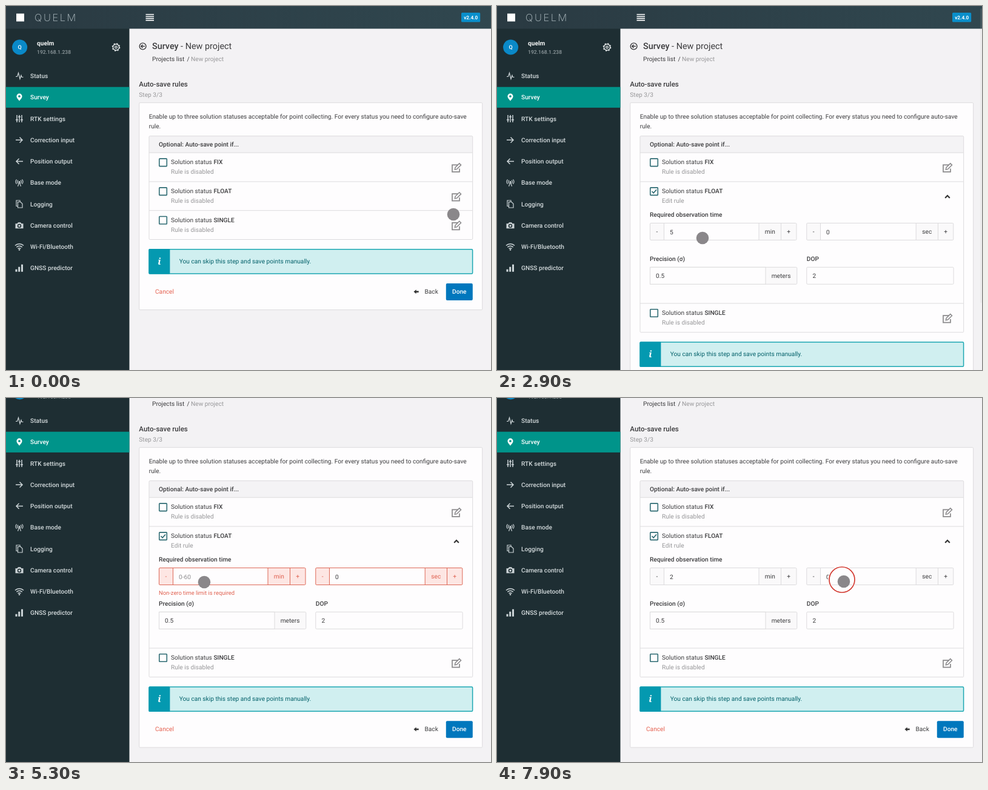
Recreate the animation shown at these times as an HTML page. Size 800x601 px, loop 8 s.

```html
<!DOCTYPE html>
<html lang="en">
<head>
<meta charset="utf-8">
<title>Survey auto-save rules</title>
<style>
html, body { margin: 0; width: 100%; height: 100%; overflow: hidden; background: #f3f2f4; }
svg { display: block; font: 10.16px Roboto, sans-serif; text-rendering: geometricPrecision; }
text { fill: #3c3c3e; white-space: pre; }
.m { font-weight: 500; }
.g { fill: #979799; }
.nav text { fill: #d3dadc; font-weight: 500; }
.line { fill: none; stroke: #dcdbdd; }
.icon { fill: none; stroke: #ccd4d7; stroke-width: 1.5; }
.edit { fill: none; stroke: #8a898b; stroke-width: 1.7; }
.box { fill: #fefdfe; stroke: #2c6a72; stroke-width: 1.56; }
.side { fill: #faf9fa; stroke: #dcdbdd; }
.input { fill: #fefdfe; stroke: #dcdbdd; }
.err .side { fill: #fde6e3; stroke: #dd6857; }
.err .input { stroke: #dd6857; }
.err .unit { fill: #e0604f; }
</style>
</head>
<body>
<svg width="800" height="601" viewBox="0 0 800 601"></svg>
<script>
const svg = document.querySelector('svg');
const SCROLL = 78, GROWTH = 153.3, LOOP = 8000;

const text = (x, y, s, cls = '', extra = '') => `<text x="${x}" y="${y}" class="${cls}" ${extra}>${s}</text>`;
const rect = (x, y, w, h, extra) => `<rect x="${x}" y="${y}" width="${w}" height="${h}" ${extra}/>`;
const path = (d, extra = '') => `<path d="${d}" ${extra}/>`;
const circle = (x, y, r, extra = '') => `<circle cx="${x}" cy="${y}" r="${r}" ${extra}/>`;
const group = (x, y, body, extra = '') => `<g transform="translate(${x} ${y})" ${extra}>${body}</g>`;

// Icons are drawn around their own centre.
const solid = 'fill="#ccd4d7" stroke="none"';
const menu = [
  ['Status', path('M-6 1H-3.5L-1.5-5L1 5L3 -1L4 2H6.5', 'stroke-width="1.2"')],
  ['Survey', path('M0 6C-2 3-4.6 1-4.6-1.6A4.6 4.6 0 0 1 4.6-1.6C4.6 1 2 3 0 6Z', 'fill="#fff" stroke="none"') + circle(0, -1.6, 1.8, 'fill="#00948a" stroke="none"')],
  ['RTK settings', path('M-4-6V6M0-6V6M4-6V6M-6 2H-2M-2-3H2M2 2H6')],
  ['Correction input', path('M-6 0H5M.5-4.5L5 0L.5 4.5')],
  ['Position output', path('M6 0H-5M-.5-4.5L-5 0L-.5 4.5')],
  ['Base mode', path('M0-1L-2.5 6M0-1L2.5 6M-2-4A3 3 0 0 0-2 1M2-4A3 3 0 0 1 2 1M-4.5-5.5A6 6 0 0 0-4.5 2M4.5-5.5A6 6 0 0 1 4.5 2', 'stroke-width="1.2"') + circle(0, -1.5, 1.3, solid)],
  ['Logging', path('M-2.5-3.5H2L5-.5V6H-2.5ZM-2.5 3.5H-5V-6H1V-3.5', 'stroke-width="1.2"')],
  ['Camera control', path('M-6.5-3H-3.5L-2-5H2L3.5-3H6.5V5H-6.5Z', solid) + circle(0, .7, 2.5, 'stroke="#1e2e33"')],
  ['Wi-Fi/Bluetooth', path('M-7-2A10 10 0 0 1 7-2M-4.7.7A6.6 6.6 0 0 1 4.7.7M-2.4 3.2A3.3 3.3 0 0 1 2.4 3.2') + circle(0, 5, 1.3, solid)],
  ['GNSS predictor', path('M-6.5 6V2H-3.5V6ZM-1.8 6V-2H1.2V6ZM3 6V-6H6V6Z', solid)],
];
const pencil = path('M2.5-5H-7V6.5H5V1') + path('M-2.7 2.7L-2-.7L4.8-7.5L7.5-4.8L.7 2Z', 'stroke-width="1.5"');

const header = `
  ${rect(0, 0, 800, 37.5, 'fill="url(#bar)"')}
  ${rect(17, 12.5, 13, 13, 'fill="#fff"')}
  ${text(47, 25, 'QUELM', '', 'style="font:200 16.4px Inter,sans-serif;letter-spacing:2.6px;fill:#b9c6cb"')}
  ${path('M230.5 14H244M230.5 17.2H244M230.5 20.4H244M230.5 23.6H244', 'stroke="#fff" stroke-width="1.6"')}
  ${rect(751, 11, 31.2, 15.6, 'rx="1.5" fill="#0a8fcb"')}
  ${text(766.7, 21.8, 'v2.4.0', '', 'text-anchor="middle" style="font-size:8.2px;font-weight:700;fill:#fff"')}`;

const sidebar = `
  ${circle(22.6, 68, 12.5, 'fill="#0a89c8"')}
  ${text(22.6, 71.3, 'Q', 'm', 'text-anchor="middle" style="font-size:9px;fill:#fff"')}
  ${text(51, 64.5, 'quelm', '', 'style="font-weight:700;fill:#f4f6f6"')}
  ${text(51, 79, '192.168.1.238', '', 'style="font-size:8.6px;fill:#8f9a9e"')}
  ${group(181.5, 68, circle(0, 0, 5) + circle(0, 0, 6.2, 'stroke-dasharray="2.4 2.47"') + circle(0, 0, 1.8), 'class="icon" style="stroke:#e6eaeb;stroke-width:1.3"')}
  ${rect(0, 133.7, 203.5, 34.2, 'fill="#00948a"')}
  ${menu.map(([label, icon], i) => {
    const y = 115.5 + i * 35.25;
    return group(22, y, icon, 'class="icon"' + (i === 1 ? ' style="stroke:#fff"' : '')) +
      text(40, y + 3.5, label, '', i === 1 ? 'style="fill:#fff"' : '');
  }).join('')}`;

const statusRow = (y, name) => `
  ${rect(252.8, y - 6.1, 12.5, 12.5, 'rx=".8" class="box"')}
  ${text(272, y + 3.2, `Solution status <tspan class="m">${name}</tspan>`)}`;
const disabledRule = y => text(272, y + 19, 'Rule is disabled', 'g') + group(743, y + 9.2, pencil, 'class="edit"');

const stepper = (x, w, cuts, unit, value, id) => {
  const [a, b, c] = cuts;
  const middle = 'text-anchor="middle"';
  return rect(x, 358.5, w, 28, 'rx="1.5" class="side"') +
    rect(a, 358.5, b - a, 28, 'class="input"') +
    path(`M${c} 358.5V386.5`, 'class="side"') +
    text((x + a) / 2, 375.7, '-', 'unit', middle) +
    text((b + c) / 2, 376, unit, 'unit', middle) +
    text((c + x + w) / 2, 376, '+', 'unit', middle) +
    text(a + 9.5, 376.5, value, '', `id="${id}"`);
};

const ruleForm = `
  ${text(252, 348.3, 'Required observation time', 'm')}
  <g id="time">
    ${stepper(252.5, 241.5, [275.5, 432, 468.5], 'min', '5', 'minutes')}
    ${stepper(510.8, 242, [533.5, 691.2, 727.5], 'sec', '0', 'seconds')}
    ${text(252, 402.5, 'Non-zero time limit is required', 'unit', 'id="warning" style="font-size:9.4px"')}
    ${rect(0, 366.5, .9, 12, 'id="caret" fill="#222"')}
  </g>
  ${text(252, 421, 'Precision (σ)', 'm')}
  ${rect(252.5, 431.3, 242.3, 28, 'rx="1.5" class="side"')}
  ${rect(252.5, 431.3, 190.5, 28, 'class="input"')}
  ${text(262, 449.2, '0.5')}${text(452.7, 448.8, 'meters')}
  ${text(510.8, 421, 'DOP', 'm')}
  ${rect(510.8, 431.3, 242.3, 28, 'rx="1.5" class="input"')}
  ${text(520.5, 449.2, '2')}`;

const content = `
  ${circle(225.6, 66.5, 5.4, 'fill="none" stroke="#3c3c3e" stroke-width="1.4"')}
  ${path('M229 66.5H223M225.5 63.7L222.7 66.5L225.5 69.3', 'fill="none" stroke="#3c3c3e" stroke-width="1.4"')}
  ${text(241, 71.3, '<tspan class="m">Survey</tspan> - New project', '', 'style="font-size:14.4px"')}
  ${text(241, 91, 'Projects list')}${text(298.5, 91, '/')}${text(305, 91, 'New project', 'g')}
  ${text(219.3, 132.8, 'Auto-save rules', 'm', 'style="font-size:11.55px"')}
  ${text(219.3, 149.5, 'Step 3/3', 'g')}
  <rect id="card" x="219.7" y="159.7" width="566" rx="1.5" fill="#fefdfe" stroke="#dcdbdd"/>
  ${text(235.7, 186.4, 'Enable up to three solution statuses acceptable for point collecting. For every status you need to configure auto-save')}
  ${text(235.7, 202, 'rule.')}
  ${rect(236, 214.7, 533.7, 27.5, 'fill="#f4f3f5"')}
  <rect id="table" x="236" y="214.7" width="533.7" rx="1.5" class="line"/>
  ${path('M236 242.2H769.7M236 290H769.7', 'class="line"')}
  ${text(252, 231.8, 'Optional: Auto-save point if...', 'm')}
  ${statusRow(258.2, 'FIX')}${disabledRule(258.2)}
  ${statusRow(306, 'FLOAT')}
  <g id="closed">${disabledRule(306)}</g>
  <g id="open">
    ${path('M255.5 306L258.2 308.8L263 303.2', 'fill="none" stroke="#2c6a72" stroke-width="1.7"')}
    ${text(272, 325, 'Edit rule', 'g')}
    ${path('M739.2 317L743 313L746.8 317', 'fill="none" stroke="#333" stroke-width="2.2"')}
    <g clip-path="url(#reveal)">${ruleForm}</g>
  </g>
  <g id="below">
    ${path('M236 337.7H769.7', 'class="line"')}
    ${statusRow(353.6, 'SINGLE')}${disabledRule(353.6)}
    ${rect(236.1, 401.8, 533.5, 40.1, 'rx="1.5" fill="#d0eff0" stroke="#1ba7b2" stroke-width="1.5"')}
    ${rect(235.4, 401.1, 35, 41.5, 'rx="1.5" fill="#0499b0"')}
    ${text(253, 427, 'i', '', 'text-anchor="middle" style="font:italic 700 15px \'Noto Serif\',serif;fill:#fff"')}
    ${text(285.7, 425, 'You can skip this step and save points manually.', '', 'style="fill:#03616a"')}
    ${text(246, 475, 'Cancel', '', 'style="fill:#e5604f"')}
    ${path('M672.5 471.7L676.7 468.2V470.4H680.7V473H676.7V475.2Z', 'fill="#333"')}
    ${text(690.5, 475, 'Back')}
    ${rect(725.8, 457.9, 44, 28.1, 'rx="2" fill="#0077bd"')}
    ${text(747.8, 475, 'Done', 'm', 'text-anchor="middle" style="fill:#fff"')}
  </g>`;

svg.innerHTML = `
  <defs>
    <linearGradient id="bar"><stop stop-color="#2a3a42"/><stop offset="1" stop-color="#30474f"/></linearGradient>
    <clipPath id="reveal"><rect id="window" x="236" y="330" width="534"/></clipPath>
  </defs>
  ${rect(0, 0, 203.5, 601, 'fill="#1e2e33"')}
  <g id="page"><g class="nav">${sidebar}</g>${content}${header}</g>
  <rect id="thumb" x="797" width="3" height="486" rx="1" fill="#b5b4b7"/>
  <g id="ring" fill="none">${circle(0, 0, 1, 'stroke="#fff" stroke-width="4"')}${circle(0, 0, 1, 'stroke="#d23a32" stroke-width="1.7"')}</g>
  <circle id="pointer" r="10.3" fill="#8a878a"/>`;

const el = Object.fromEntries([...svg.querySelectorAll('[id]')].map(e => [e.id, e]));
const set = (e, attrs) => { for (const k in attrs) e.setAttribute(k, attrs[k]); };
const show = (e, on) => { e.style.display = on ? '' : 'none'; };
const ramp = (t, a, b) => Math.min(1, Math.max(0, (t - a) / (b - a)));
const smooth = p => p * p * (3 - 2 * p);

// Pointer stops: time, x, y
const route = [
  [0, 738, 344], [100, 730, 343], [700, 480, 326], [1100, 321, 315], [1400, 260, 307], [2100, 260, 307],
  [2700, 339, 383], [2900, 339, 383], [3000, 339, 382], [3600, 339, 382], [4100, 327, 304],
  [5700, 327, 304], [6100, 348, 305], [6700, 348, 305], [7400, 564, 302], [7600, 569, 300], [7900, 572, 303],
];
const clicks = [[1700, 260, 307], [4100, 327, 304], [7600, 569, 300]];
const OPEN = 1900, FOCUS = 4200, ERASE = 4800, TYPE = 5900, BLUR = 7700;

function pointerAt(t) {
  const i = route.findIndex(stop => stop[0] > t);
  if (i < 0) return route[route.length - 1].slice(1);
  const [t0, x0, y0] = route[i - 1], [t1, x1, y1] = route[i];
  const p = ramp(t, t0, t1);
  return [x0 + (x1 - x0) * p, y0 + (y1 - y0) * p];
}

function draw(t) {
  const grown = GROWTH * smooth(ramp(t, OPEN, OPEN + 300));
  const scrolled = smooth(ramp(t, 2900, 3100));
  set(el.page, { transform: `translate(0 ${-SCROLL * scrolled})` });
  set(el.below, { transform: `translate(0 ${grown})` });
  set(el.card, { height: 342 + grown });
  set(el.table, { height: 170.8 + grown });
  set(el.window, { height: 7 + grown });
  show(el.open, t >= OPEN);
  show(el.closed, t < OPEN);
  set(el.thumb, { y: 4 + 62 * scrolled, opacity: (.12 * ramp(t, 2700, 2900) + .88 * scrolled) * (1 - ramp(t, 3400, 3700)) });

  const empty = t >= ERASE && t < TYPE;
  el.minutes.textContent = empty ? '0-60' : t < ERASE ? '5' : '2';
  el.minutes.style.fill = empty ? '#8f8e90' : '';
  el.time.classList.toggle('err', empty);
  show(el.warning, empty);
  const since = t - (t >= TYPE ? TYPE : t >= ERASE ? ERASE : FOCUS);
  show(el.caret, t >= FOCUS && t < BLUR && since % 1000 < 500);
  set(el.caret, { x: empty ? 285 : 291 });

  const [cx, cy] = pointerAt(t);
  set(el.pointer, { cx, cy });
  const click = clicks.find(c => t > c[0] && t < c[0] + 400);
  show(el.ring, click);
  if (click) {
    set(el.ring, { transform: `translate(${click[1]} ${click[2]})` });
    for (const c of el.ring.children) set(c, { r: (t - click[0]) * .07 });
  }
}

function tick() {
  draw(Math.floor(performance.now() % LOOP / 100) * 100);
  requestAnimationFrame(tick);
}
tick();
</script>
</body>
</html>
```
